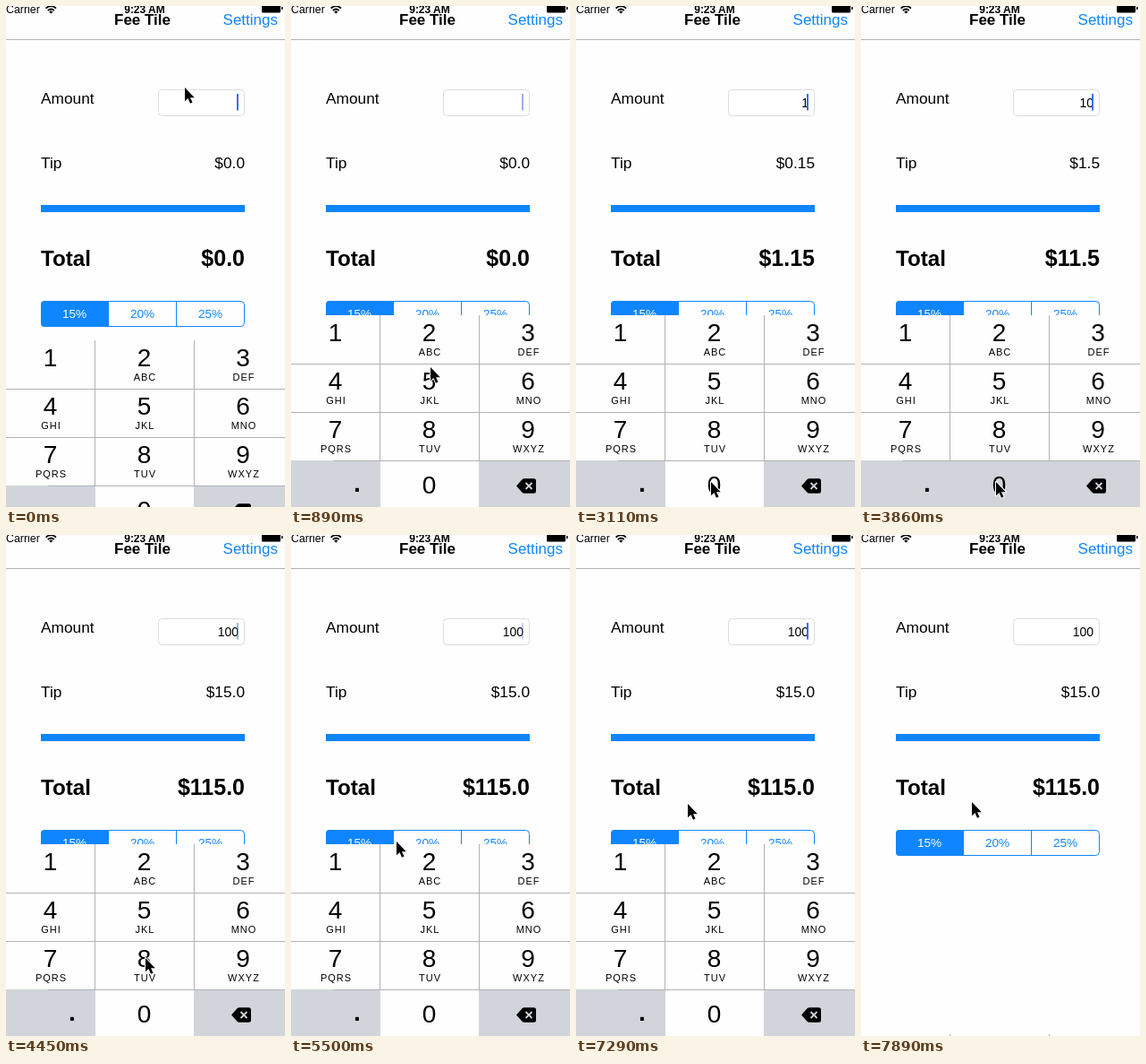
An HTML page that plays this animation: 312 by 559 pixels, repeating every 8 s.

```html
<!DOCTYPE html>
<html lang="en">
<head>
<meta charset="utf-8">
<title>Fee Tile</title>
<style>
  html, body { margin: 0; width: 100%; height: 100%; overflow: hidden; background: #fefefe; }
  svg { display: block; width: 312px; height: 559px; }
  text { font-family: "Liberation Sans", Arial, sans-serif; font-size: 17.3px; fill: #000; white-space: pre; }
  .bold { font-weight: 700; }
  .end { text-anchor: end; }
  .mid { text-anchor: middle; }
  .blue { fill: #0f85ff; }
  .line { fill: none; stroke: #b2b2b4; }
  .seg { font-size: 13.6px; }
  .digit { font-size: 28px; }
  .abc { font-size: 11px; letter-spacing: 1px; }
  #pointer { stroke: #fff; stroke-width: 2; stroke-linejoin: round; paint-order: stroke; }
</style>
</head>
<body>
<svg viewBox="0 0 312 559">
  <rect width="312" height="559" fill="#fefefe"/>

  <text x="0" y="8" style="font-size:12.4px">Carrier</text>
  <g fill="none" stroke="#000" stroke-width="1.7">
    <path d="M44.6 2.6Q50.3-2.4 56 2.6M46.8 5Q50.3 2 53.8 5"/>
    <path d="M50.3 8.6L48.2 6.4Q50.3 4.8 52.4 6.4Z" fill="#000" stroke="none"/>
  </g>
  <text x="155" y="8" class="bold mid" style="font-size:12px">9:23 AM</text>
  <path d="M286 0H307V6Q307 7.5 305.5 7.5H287.5Q286 7.5 286 6ZM308 1H309.5V4H308Z"/>

  <text x="152.5" y="21" class="bold mid" style="font-size:17px">Fee Tile</text>
  <text x="304" y="21" class="end blue" style="font-size:17px">Settings</text>
  <path d="M0 37.5H312" class="line"/>

  <text x="39" y="109">Amount</text>
  <rect x="170.5" y="93.5" width="96" height="29" rx="4" fill="#fff" stroke="#dcdcdc"/>
  <text id="amount" x="260" y="112.5" class="end" style="font-size:14px"></text>
  <rect id="caret" x="258" y="98" width="2" height="18.5" fill="#3f6bea"/>

  <text x="39" y="181">Tip</text>
  <text id="tip" x="267" y="181" class="end"></text>
  <rect x="39" y="222" width="228" height="8" class="blue"/>
  <text x="39" y="290" class="bold" style="font-size:24.2px">Total</text>
  <text id="total" x="267" y="290" class="bold end" style="font-size:25px"></text>

  <rect x="39.5" y="329.5" width="227" height="28" rx="4" fill="#fefefe" stroke="#0f85ff"/>
  <path d="M115 329H43Q39 329 39 333V354Q39 358 43 358H115Z" class="blue"/>
  <path d="M190.5 329V358" stroke="#0f85ff"/>
  <text x="76.5" y="348" class="mid seg" style="fill:#fff">15%</text>
  <text x="152.5" y="348" class="mid seg blue">20%</text>
  <text x="228.5" y="348" class="mid seg blue">25%</text>

  <g id="keyboard"></g>
  <path id="pointer" d="M0 0V15.2L3.5 12L6 17.7L8.5 16.6L6 11.2H10.8Z"/>
</svg>
<script>
const $ = id => document.getElementById(id);
const LOOP = 8000, STEP = 148.6, LEAD = 12; // the screen refreshes once per step
const TOP = 345, ROW = 54, TRAVEL = 214, GREY = '#d1d5db';

// Keyboard, laid out at its raised position
const columns = [49.5, 154.5, 265];
const letters = ['', 'ABC', 'DEF', 'GHI', 'JKL', 'MNO', 'PQRS', 'TUV', 'WXYZ'];
const digit = (n, x, y) => `<text x="${x}" y="${y}" class="mid digit">${n}</text>`;
const keys = letters.map((abc, i) => {
  const x = columns[i % 3], y = TOP + 29 + ROW * Math.floor(i / 3);
  return digit(i + 1, x, y) + `<text x="${x + 1}" y="${y + 16}" class="mid abc">${abc}</text>`;
}).join('');

$('keyboard').innerHTML = `
  <rect y="${TOP}" width="312" height="216" fill="#fefefe"/>
  <rect y="507" width="100" height="54" fill="${GREY}"/>
  <rect x="210" y="507" width="102" height="54" fill="${GREY}"/>
  <rect id="press1" y="${TOP}" width="99" height="54" fill="${GREY}"/>
  <rect id="press0" x="100" y="507" width="110" height="54" fill="${GREY}"/>
  <path class="line" d="M0 399.5H312M0 453.5H312M47 507.5H312M99.5 ${TOP}V507M210.5 ${TOP}V507"/>
  ${keys}${digit(0, 154.5, 544)}
  <text x="74" y="542" class="mid digit bold">.</text>
  <path d="M252 535.5L258.5 528.3Q259.4 527.3 261 527.3H271.5Q274 527.3 274 529.8V541.2Q274 543.7 271.5 543.7H261Q259.4 543.7 258.5 542.7Z"/>
  <path d="M262.5 532L269.5 539M269.5 532L262.5 539" stroke="${GREY}" stroke-width="1.8"/>`;

// Pointer stops: time, x, y
const stops = [[0, 200, 91], [880, 156, 403], [1630, 63, 372], [2520, 63, 372], [3100, 151, 531],
  [4000, 151, 531], [4445, 156, 473], [4600, 142, 372], [5650, 114, 336], [6200, 145, 335],
  [6700, 145, 335], [7300, 124, 298], [LOOP, 124, 298]];

function pointerAt(t) {
  const i = stops.findIndex(s => s[0] > t);
  const [t0, x0, y0] = stops[i - 1], [t1, x1, y1] = stops[i];
  const k = (t - t0) / (t1 - t0);
  return [x0 + (x1 - x0) * k, y0 + (y1 - y0) * k].map(Math.round);
}

// Remaining share of a critically damped slide
const RISE = -195, FALL = 7500;
const settle = ms => { const w = ms * 0.01826; return (1 + w) * Math.exp(-w); };
const dropAt = t => TRAVEL * (t < FALL ? settle(t - RISE) : 1 - settle(t - FALL));

// Key presses: "1", then "0" tapped twice
const ONE = 2200, ZERO = 3540, FIRST = 3840, SECOND = 3990;
const amountAt = t => t < ONE + STEP ? 0 : t < FIRST ? 1 : t < SECOND ? 10 : 100;
const money = cents => '$' + (cents % 100 ? cents / 100 : (cents / 100).toFixed(1));

function caretAt(t) {
  if (t >= FALL) return 0;
  if (t >= ZERO && t < SECOND) return 1; // solid while typing
  const p = t % 1000;
  const alpha = p < 700 ? (550 - p) / 200 : (p - 800) / 150;
  return Math.min(1, Math.max(0, alpha));
}

const show = (id, on) => $(id).setAttribute('visibility', on ? 'visible' : 'hidden');
const move = (id, x, y) => $(id).setAttribute('transform', `translate(${x} ${y})`);

function draw(t) {
  const amount = amountAt(t);
  $('amount').textContent = amount || '';
  $('tip').textContent = money(amount * 15);
  $('total').textContent = money(amount * 115);
  $('caret').setAttribute('opacity', caretAt(t));
  show('press1', t >= ONE && t < ONE + STEP);
  show('press0', t >= ZERO && t < SECOND);
  move('keyboard', 0, Math.round(dropAt(t)));
  move('pointer', ...pointerAt(t));
}

const start = performance.now();
function frame() {
  const now = (performance.now() - start) % LOOP;
  draw(Math.max(0, Math.floor((now + LEAD) / STEP) * STEP - LEAD));
  requestAnimationFrame(frame);
}
frame();
</script>
</body>
</html>
```
